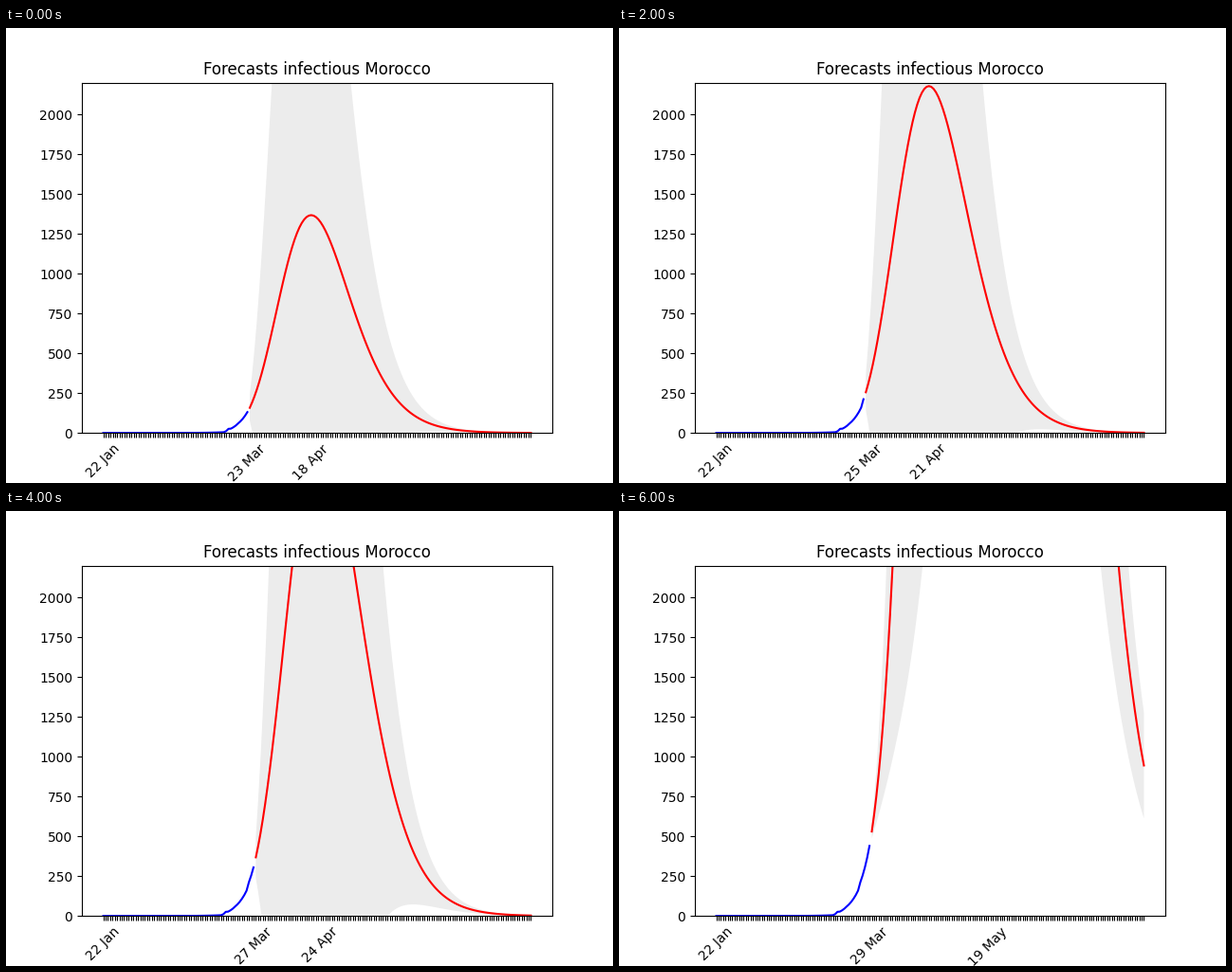
A matplotlib script that plays this animation: 640x480 px, repeating every 7 s.

```python
import matplotlib.pyplot as plt
import numpy as np
from matplotlib.animation import FuncAnimation

START = np.datetime64("2020-01-22")
FIRST_CUTOFF = 61
HORIZON = 120
RECOVERY = .11
NEXT_DAY = 1.205

# Key points of the case count, joined by steady exponential growth.
KEY_DAYS = [0, 40, 51, 53, 54, 57, 60, 62, 63, 67]
KEY_CASES = [.1, 1, 5, 26, 27, 59, 108, 159, 212, 440]

# Each forecast: starting growth per day, days to the peak, relative spread.
FORECASTS = [(.2, 26, 3.75), (.17, 19, 2.79), (.19, 27, 3.3), (.185, 29, 3.1),
             (.18, 28, 2.77), (.18, 37.8, 1.97), (.18, 51, 1.13)]


def cases(day):
    return np.exp(np.interp(day, KEY_DAYS, np.log(KEY_CASES)))


def infectious(t, first, growth, rise):
    """Infection rate decays exponentially and meets recovery at the peak."""
    infection = growth + RECOVERY
    decay = np.log(infection / RECOVERY) / rise
    return first * np.exp(infection / decay * (1 - np.exp(-decay * t)) - RECOVERY * t)


def margin(t, rise, spread):
    """Relative half-width of the band: quick to open, slow to close."""
    return spread * (1 - np.exp(-(t + 1) / (.26 * rise))) * np.exp(-t / (2 * rise))


def date_label(day):
    return (START + int(day)).astype(object).strftime("%d %b")


fig, ax = plt.subplots(figsize=(6.4, 4.8), dpi=100)


def draw(i):
    ax.clear()
    growth, rise, spread = FORECASTS[i]
    cutoff = FIRST_CUTOFF + i
    last = cutoff + HORIZON
    past = np.arange(cutoff + 1)
    t = np.arange(HORIZON)
    ahead = cutoff + 1 + t

    mean = infectious(t, NEXT_DAY * cases(cutoff), growth, rise)
    half = mean * margin(t, rise, spread)
    ax.fill_between(ahead, mean - half, mean + half,
                    color="gray", alpha=.15, linewidth=0)
    ax.plot(past, cases(past), color="blue")
    ax.plot(ahead, mean, color="red")

    marked = (0, cutoff, ahead[mean.argmax()])
    labels = [""] * (last + 1)
    for day in marked:
        # The peak is named by the day before it.
        labels[day] = date_label(day - (day > cutoff))
    ax.set_xticks(range(last + 1), labels, rotation=45)
    ax.set_xlim(-.05 * last, 1.05 * last)
    ax.set_ylim(0, 2200)
    ax.set_title("Forecasts infectious Morocco")
    return []


anim = FuncAnimation(fig, draw, frames=len(FORECASTS), interval=1000,
                     repeat=True, repeat_delay=0, init_func=lambda: [])
plt.show()
```
